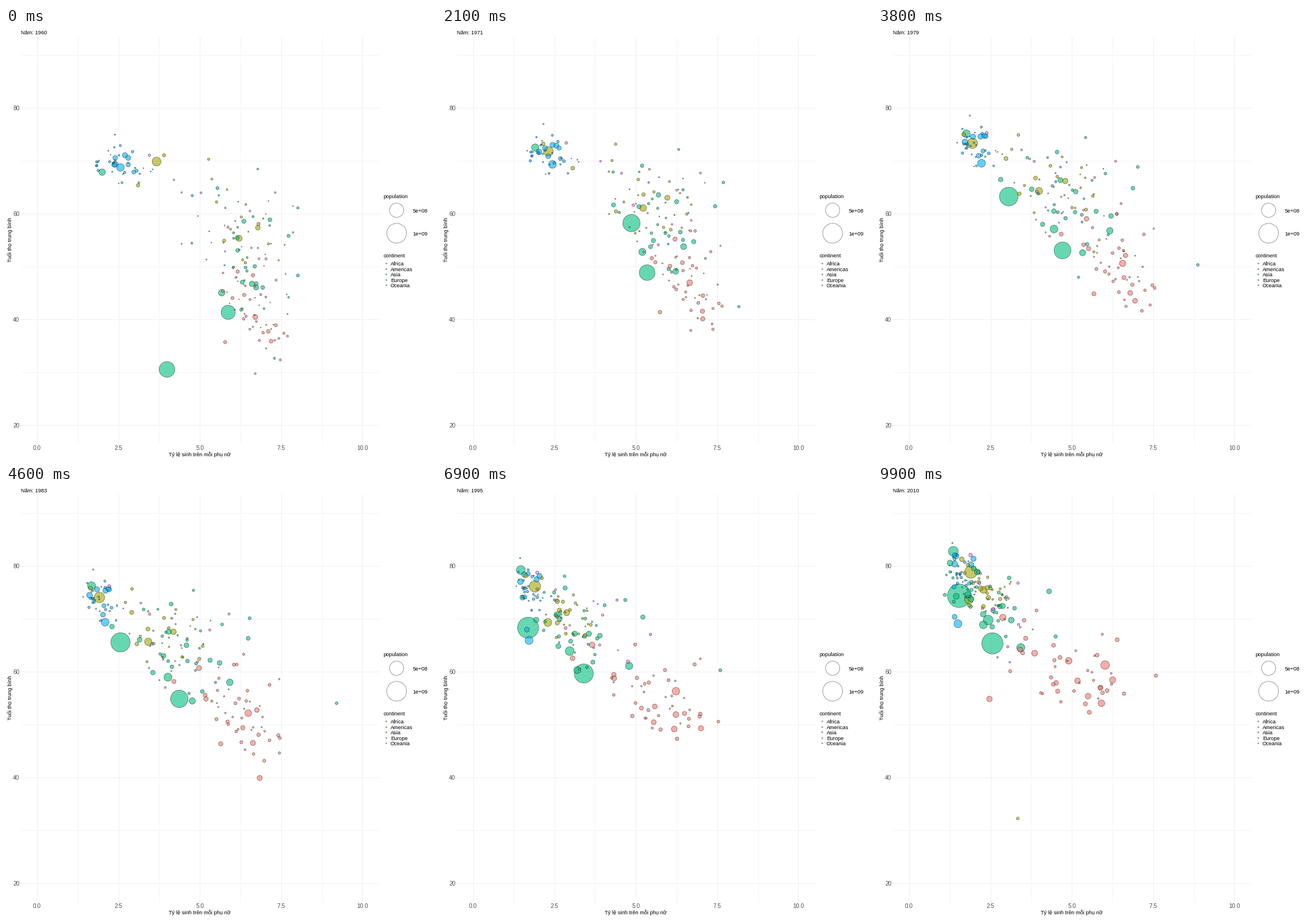
Animation of 748 by 748 pixels, one loop 10 s. Source, as a matplotlib script:

```python
import matplotlib.pyplot as plt
import numpy as np
from matplotlib.animation import FuncAnimation
from matplotlib.colors import to_rgba

SIZE, DPI, FRAMES = 748, 88, 100
PT = 72 / DPI                      # one pixel in points
T = np.linspace(0, 1, FRAMES)
HUES = {"Africa": "#F8766D", "Americas": "#A3A500", "Asia": "#00BF7D",
        "Europe": "#00B0F6", "Oceania": "#E76BF3"}
GROWTH = {"Africa": 1.7, "Americas": 1.4, "Asia": 1.48,
          "Europe": 1.05, "Oceania": 1.35}
EDGE = (0, 0, 0, 0.6)
LINE = 0.65

plt.rcParams["font.family"] = ["Liberation Sans", "DejaVu Sans"]
rng = np.random.default_rng(12)
bubbles = []


def sx(fertility):
    return 54 + 56.65 * fertility


def sy(life):
    return 874.5 - 9.2 * life


def area(r):
    return ((2 * r - LINE) * PT) ** 2


def add(continent, r, fert, life):
    radius = r * (1 + (GROWTH[continent] - 1) * T)
    bubbles.append((radius, sx(fert), sy(life), HUES[continent]))


def country(continent, r, fert, life, mid=0.45, speed=6, bend=0.75, dip=None):
    """Births fall along a logistic curve, life rises along a power curve.

    dip = (time, width, depth) is a crisis that lowers life for a while.
    """
    def wave(t):
        return 1 / (1 + np.exp(-speed * (t - mid)))
    fall = (wave(T) - wave(0)) / (wave(1) - wave(0))
    years = life[0] + (life[1] - life[0]) * T ** bend
    if dip:
        when, width, depth = dip
        years = years - depth * np.exp(-((T - when) / width) ** 2)
    add(continent, r, fert[0] + (fert[1] - fert[0]) * fall, years)


def journey(continent, r, *stops):
    """A country too irregular for the curves: stops of (time, births, life)."""
    when, fert, life = zip(*stops)
    add(continent, r, np.interp(T, when, fert), np.interp(T, when, life))


def crowd(continent, count, fert, life, mid, bend=0.8, crises=0):
    """Random countries; fert and life hold (mean, spread) at start and end."""
    for _ in range(count):
        u, w, v, m = np.clip(rng.normal(size=4), -1.8, 1.8)
        end = 0.5 * u + 0.87 * w
        rank = 0.87 * v - 0.5 * end
        births = fert[0][0] + fert[0][1] * u, max(1.1, fert[1][0] + fert[1][1] * end)
        years = [mean + spread * rank for mean, spread in life]
        dip = (0.85, 0.15, rng.uniform(4, 14)) if rng.random() < crises else None
        r = np.clip(rng.lognormal(0.58, 0.36), 1.1, 3.6)
        country(continent, r, births, years, mid + 0.12 * m, bend=bend, dip=dip)


journey("Asia", 14, (0, 3.99, 30.5), (0.02, 3.28, 32.5), (0.04, 6, 44),
        (0.06, 7.45, 48), (0.12, 6.21, 55.4), (0.3, 3.58, 60.8),
        (0.465, 2.56, 65.5), (0.7, 1.68, 68.3), (0.84, 1.47, 70.2), (1, 1.54, 74.3))
country("Asia", 12.7, (5.87, 2.56), (41.3, 65.3), mid=0.5, speed=4)
country("Asia", 6, (5.67, 2.43), (45, 69.7))
country("Asia", 6, (2, 1.36), (67.8, 82.7))
country("Asia", 5, (6.6, 3.43), (46.7, 64.5), mid=0.7, bend=0.6)
country("Asia", 4.8, (6.73, 2.28), (46, 68.8), mid=0.5, bend=1.3)
country("Asia", 4, (6.35, 1.82), (58.5, 74.5))
country("Asia", 3.7, (7.15, 3.14), (58.8, 69.7), mid=0.35)
country("Asia", 3.7, (6.93, 1.9), (46, 73.7), mid=0.58, speed=9)
country("Asia", 3.7, (6.15, 1.45), (55.4, 74.2), mid=0.35)
country("Asia", 3.7, (6.3, 2.1), (47, 78.8), mid=0.4, bend=0.9)
country("Asia", 3.6, (6.16, 1.26), (53, 80.5), mid=0.2)
country("Asia", 2, (6.97, 2.97), (42, 66.6), mid=0.4, dip=(0.32, 0.05, 31))
journey("Asia", 2.3, (0, 7.29, 32.6), (0.465, 9.2, 54), (0.7, 7.57, 60.3), (1, 4.5, 66.6))

country("Americas", 8, (3.67, 1.9), (69.8, 78.8), mid=0.11, speed=14, bend=1)
country("Americas", 5.7, (6.2, 1.84), (55.3, 73.6), mid=0.35)
country("Americas", 4.4, (6.78, 2.28), (57.3, 75.4), mid=0.4)
country("Americas", 3.2, (3.9, 1.62), (71, 81.2), mid=0.11, speed=14, bend=1)
country("Americas", 3.2, (6.8, 2.4), (58, 75.8), mid=0.22)
country("Americas", 3.3, (3.1, 2.2), (65.3, 75.7), mid=0.7)
country("Americas", 2, (6.3, 3.34), (42, 64), mid=0.6, dip=(1, 0.008, 31.8))

country("Africa", 4.6, (6.7, 6.02), (40.4, 61.2), mid=0.6)
country("Africa", 3.6, (7.1, 4.9), (37.7, 62), mid=0.85, bend=1.5, dip=(0.48, 0.02, 10))
journey("Africa", 3.3, (0, 6.16, 49), (0.465, 6.75, 52.7), (0.7, 7, 49.2), (1, 6.25, 58.4))
country("Africa", 3.5, (6.63, 2.88), (48.3, 70.2), mid=0.5)
country("Africa", 3, (6, 2.47), (44, 70), bend=0.8, dip=(0.95, 0.15, 17))
country("Africa", 1.9, (7.3, 7.58), (36, 59.2), bend=1.3)
country("Africa", 2, (6.7, 6.6), (29.7, 55.8))

country("Europe", 7, (2.56, 1.5), (68.7, 70.5), mid=0.5, dip=(0.78, 0.2, 5))
country("Europe", 5.3, (2.4, 1.4), (69.3, 80.3), mid=0.2, bend=1)
country("Europe", 4.9, (2.7, 1.9), (71, 80.2), mid=0.25, bend=1)
country("Europe", 4.7, (2.8, 1.98), (70.5, 81.3), mid=0.28, bend=1)
country("Europe", 4.8, (2.37, 1.45), (69.2, 81.8), mid=0.4, bend=0.9)
country("Europe", 4.1, (2.8, 1.4), (69.2, 82), mid=0.5, bend=0.9)
country("Europe", 4.5, (2.4, 1.4), (70.5, 71.5), mid=0.55, dip=(0.78, 0.2, 4))
country("Europe", 3.8, (2.97, 1.38), (67.8, 76), mid=0.4)

country("Oceania", 2.6, (3.45, 1.89), (71, 82), mid=0.2, bend=1)

crowd("Africa", 43, [(6.7, 0.55), (4.7, 1.1)], [(43, 5.5), (62, 5)], 0.68, crises=0.3)
crowd("Americas", 29, [(6.15, 0.95), (2.45, 0.5)], [(57, 6), (74.8, 2.4)], 0.36)
crowd("Asia", 32, [(6.3, 0.95), (2.45, 0.8)], [(54, 7.5), (74.3, 3.6)], 0.5)
crowd("Europe", 30, [(2.65, 0.5), (1.6, 0.2)], [(69.3, 2.5), (78, 2.8)], 0.36, bend=1)
crowd("Oceania", 9, [(6, 1), (3.1, 0.8)], [(57, 6), (71.5, 4.5)], 0.5)

# large bubbles lie underneath
bubbles.sort(key=lambda b: -b[0].mean())
radii, xs, ys = (np.array(part) for part in list(zip(*bubbles))[:3])
fills = [to_rgba(b[3], 0.6) for b in bubbles]

fig = plt.figure(figsize=(SIZE / DPI, SIZE / DPI), dpi=DPI, facecolor="white")
ax = fig.add_axes([0, 0, 1, 1])
ax.set(xlim=(0, SIZE), ylim=(SIZE, 0))
ax.axis("off")


def label(x, y, s, size=9.3, **kw):
    style = dict(fontsize=size * PT, color="black", va="center_baseline")
    return ax.text(x, y, s, **{**style, **kw})


def grid(xs, ys, major):
    ax.plot(xs, ys, color="#EEEEEE", lw=(0.9 if major else 0.6) * PT, zorder=0)


def tick(x, y, s, ha):
    label(x, y, s, size=10.1, ha=ha, color="#4D4D4D")


for i in range(9):
    x, major = sx(1.25 * i), i % 2 == 0
    grid([x, x], [14, 723], major)
    if major:
        tick(x, 730, f"{1.25 * i:.1f}", "center")
for i in range(8):
    y, major = sy(20 + 10 * i), i % 2 == 0
    grid([26, 649], [y, y], major)
    if major:
        tick(23.5, y + 0.5, str(20 + 10 * i), "right")

label(337, 741, "Tỷ lệ sinh trên mỗi phụ nữ", ha="center")
label(7, 368, "Tuổi thọ trung bình", ha="center", va="center", rotation=90)
title = label(26, 7, "")

label(656.5, 292, "population")
for y, r, name in ((317, 12.7, "5e+08"), (357, 17.5, "1e+09")):
    ax.scatter(679.5, y, s=area(r), facecolor="none", edgecolor=EDGE, lw=LINE * PT)
    label(707.5, y + 0.5, name)
label(656.5, 395.5, "continent")
for i, (name, hue) in enumerate(HUES.items()):
    y = 409 + 9.5 * i
    ax.scatter(661, y, s=area(1.2), facecolor=to_rgba(hue, 0.6),
               edgecolor=EDGE, lw=LINE * PT)
    label(669, y + 0.5, name)

dots = ax.scatter(xs[:, 0], ys[:, 0], s=area(radii[:, 0]), facecolor=fills,
                  edgecolor=[EDGE], lw=LINE * PT, zorder=3)


def update(i):
    title.set_text(f"Năm: {round(1960 + 50 * T[i])}")
    dots.set_offsets(np.column_stack([xs[:, i], ys[:, i]]))
    dots.set_sizes(area(radii[:, i]))
    return title, dots


anim = FuncAnimation(fig, update, frames=FRAMES, interval=100, repeat=True)
plt.show()
```
